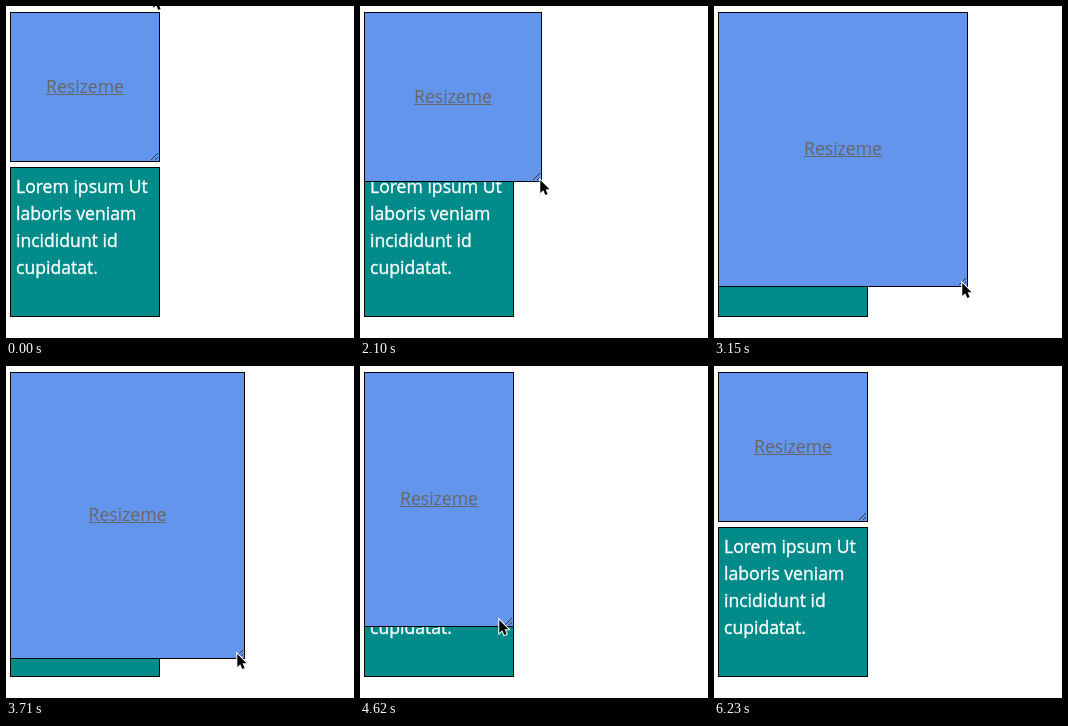
Animation of 348x332 px, one loop 7000 ms. Source, as an HTML page:

```html
<!DOCTYPE html>
<html lang="en">
<head>
<meta charset="utf-8">
<title>Resizable box</title>
<style>
  html, body { margin: 0; width: 100%; height: 100%; overflow: hidden; background: #fff; }
  body { position: relative; font: 17.6px/27px "Open Sans", sans-serif; }
  div {
    position: absolute; left: 4px; width: 150px; height: 150px;
    box-sizing: border-box; border: 1px solid #000;
  }
  #note {
    top: 161px; padding: 5px; background: #008b8b; color: #fff;
    -webkit-text-stroke: .35px #fff;
  }
  #box {
    top: 6px; padding-bottom: 2px;
    display: flex; align-items: center; justify-content: center;
    background: #6495ed; color: #666; text-decoration: underline;
  }
  svg { position: absolute; overflow: visible; }
  #grip { right: 0; bottom: 0; fill: none; stroke: #333; }
  #cursor { left: 0; top: 0; stroke: #fff; stroke-width: 2; paint-order: stroke; }
</style>
</head>
<body>
<div id="note">Lorem ipsum Ut laboris veniam incididunt id cupidatat.</div>
<div id="box">Resizeme<svg id="grip" width="9" height="9"><path d="M1 8L8 1M5 8L8 5"/></svg></div>
<svg id="cursor" width="12" height="18"><path d="M.3 1V14L3.3 11.2 5.3 16 7.6 15 5.6 10.3H9.5Z"/></svg>
<script>
const LOOP = 7000, STEP = 70, LEFT = 4, TOP = 6;

// Pointer key points: time, x, y
const path = [
  [280, 147, -12], [490, 141, 125],                    // enter
  [840, 141, 125], [1330, 148, 153],                   // reach the grip
  [1750, 148, 153], [2100, 180, 173], [2660, 251, 238], // drag
  [3290, 246, 281], [3710, 231, 287], [4270, 171, 287],
  [4830, 130, 219], [5040, 130, 178], [5600, 142, 118],
  [5880, 142, 118], [6230, 151, -30]                   // leave
];
const last = path.length - 1;

const clamp = (v, min, max) => Math.min(max, Math.max(min, v));
const slope = (i, k) => (path[i + 1][k] - path[i][k]) / (path[i + 1][0] - path[i][0]);

// Harmonic mean keeps the curve from overshooting its points
function tangent(i, k) {
  if (i === 0 || i === last) return 0;
  const a = slope(i - 1, k), b = slope(i, k);
  return a * b > 0 ? 2 * a * b / (a + b) : 0;
}

function pointerAt(time, k) {
  const t = clamp(time, path[0][0], path[last][0]);
  const i = Math.max(0, path.findIndex(p => p[0] >= t) - 1);
  const a = path[i], b = path[i + 1], span = b[0] - a[0];
  const u = (t - a[0]) / span, v = 1 - u;
  return Math.round(
    a[k] * v * v * (1 + 2 * u) + b[k] * u * u * (1 + 2 * v) +
    span * u * v * (tangent(i, k) * v - tangent(i + 1, k) * u));
}

const box = document.getElementById("box");
const cursor = document.getElementById("cursor");
const start = performance.now();

function draw() {
  const elapsed = (performance.now() - start) % LOOP;
  const t = Math.floor(elapsed / STEP) * STEP;
  const x = pointerAt(t, 1), y = pointerAt(t, 2);
  cursor.style.transform = `translate(${x}px, ${y}px)`;

  // The corner follows the pointer, slowly drifting away from it
  const dragging = t >= 1750 && t <= 5600;
  const right = dragging ? Math.round(x + .00375 * t - 5.425) : 0;
  const bottom = dragging ? Math.round(y + .002 * t - 1.55) : 0;
  box.style.width = clamp(right - LEFT, 150, 252) + "px";
  box.style.height = Math.max(bottom - TOP, 150) + "px";
  requestAnimationFrame(draw);
}
draw();
</script>
</body>
</html>
```
